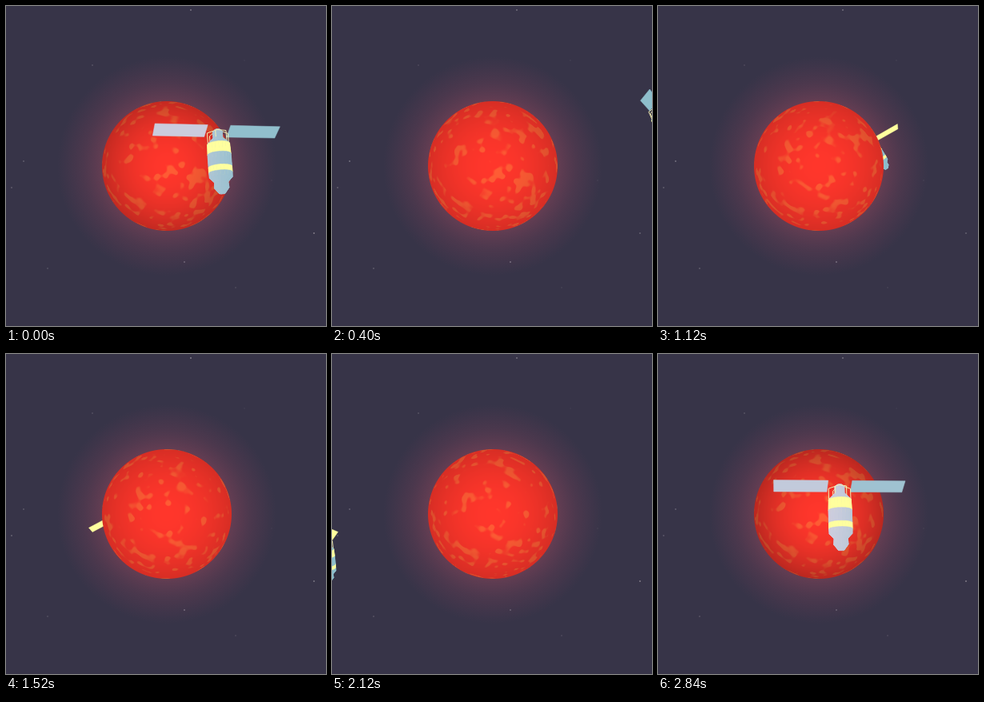
An HTML page with a canvas that plays this animation: 400 px wide and 400 px high, repeating every 2.88 s.

```html
<!DOCTYPE html>
<html lang="en">
<head>
<meta charset="utf-8">
<title>Satellite around a red star</title>
<style>
  html, body { margin: 0; width: 100%; height: 100%; overflow: hidden; background: #373448; }
  canvas { display: block; width: 100vmin; height: 100vmin; }
</style>
</head>
<body>
<canvas id="stage" width="400" height="400"></canvas>
<script>
const ctx = document.getElementById('stage').getContext('2d');
const LOOP = 2880, STEP = 40;
const SUN = { x: 201, y: 200, r: 81 };

// Orbit seen edge-on, rolled to the right; perspective camera.
const ORBIT = 316, CAMERA = 885, FOCAL = CAMERA - ORBIT;
const ROLL = Math.atan(0.25), CR = Math.cos(ROLL), SR = Math.sin(ROLL);
const START_ANGLE = 12.3, DEGREES_PER_MS = 0.1242;

const BLUE = [142, 190, 204], SHINE = [206, 205, 222];
const YELLOW = [255, 255, 158], CREAM = [246, 240, 178];

const clamp = v => Math.max(0, Math.min(1, v));
const mix = (a, b, k) => a + (b - a) * k;
const smooth = k => k * k * (3 - 2 * k);
const rgb = c => `rgb(${c.map(Math.round).join()})`;
const orbitAngle = t => (START_ANGLE + DEGREES_PER_MS * t) * Math.PI / 180;

// Satellite space -> [screen x, screen y, depth]
function project([x, y, z], angle) {
  const along = CR * x - SR * y, across = SR * x + CR * y, out = z + ORBIT;
  const c = Math.cos(angle), s = Math.sin(angle);
  const u = along * c + out * s, depth = out * c - along * s;
  const scale = FOCAL / (CAMERA - depth);
  return [200 + (u * CR + across * SR) * scale, 200 + (across * CR - u * SR) * scale, depth];
}

// Surface of revolution, leaning slightly towards the viewer at its lower end.
const ringPoint = (y, r, a) => {
  const front = r * Math.sin(a);
  return [r * Math.cos(a), y - 0.2 * front, 0.2 * (y + 30) + front];
};

const PROFILE = [ // y, radius, colour of the band below
  [-30, 3, BLUE], [-27, 6, BLUE], [-19, 6, BLUE], [-11, 14, YELLOW], [2, 14.5, BLUE],
  [18, 14.5, YELLOW], [25, 14.5, BLUE], [31, 14.2, BLUE], [37, 8.5, BLUE], [44, 9, BLUE], [51, 3.5]
];

function buildSatellite() {
  const parts = [], SIDES = 20, turn = i => i / SIDES * 2 * Math.PI;
  for (let b = 0; b < PROFILE.length - 1; b++) {
    const [y0, r0, color] = PROFILE[b], [y1, r1] = PROFILE[b + 1];
    for (let i = 0; i < SIDES; i++) {
      const a = turn(i), e = turn(i + 1);
      parts.push({ color, points: [ringPoint(y0, r0, a), ringPoint(y0, r0, e), ringPoint(y1, r1, e), ringPoint(y1, r1, a)] });
    }
  }
  for (const [x0, x1] of [[-82, -15], [15, 82]])
    parts.push({ color: BLUE, back: YELLOW,
      points: [[x0, -34.5, 8], [x1, -34.5, 8], [x1, -21.5, -8], [x0, -21.5, -8]] });
  for (let i = 0; i < 6; i++) {
    const a = i * Math.PI / 3;
    parts.push({ color: CREAM, line: true,
      points: [[0, -30, 0], ringPoint(-25, 13.8, a), ringPoint(-11, 13.8, a)] });
  }
  return parts;
}
const satellite = buildSatellite();

function drawSatellite(angle) {
  const faces = satellite.map(part => {
    const pts = part.points.map(p => project(p, angle));
    const mean = k => pts.reduce((sum, p) => sum + p[k], 0) / pts.length;
    return { ...part, pts, x: mean(0), depth: mean(2) };
  }).sort((a, b) => a.depth - b.depth);

  for (const { pts, x, color, back, line } of faces) {
    const area = pts.reduce((sum, p, i) => {
      const q = pts[(i + 1) % pts.length];
      return sum + p[0] * q[1] - q[0] * p[1];
    }, 0);
    let tint = back && area < 0 ? back : color;
    if (tint === BLUE && Math.cos(angle) > 0) {
      const shine = Math.exp(-(((x - 205) / 60) ** 2));
      tint = BLUE.map((v, i) => mix(v, SHINE[i], shine));
    }
    ctx.beginPath();
    pts.forEach(p => ctx.lineTo(p[0], p[1]));
    ctx.strokeStyle = ctx.fillStyle = rgb(tint);
    ctx.lineWidth = line ? 1 : 0.5;
    if (!line) { ctx.closePath(); ctx.fill(); }
    ctx.stroke();
  }
}

// Seeded value noise for the star's surface
function hash(x, y, z) {
  let h = Math.imul(x, 374761393) ^ Math.imul(y, 668265263) ^ Math.imul(z, 1274126177);
  h = Math.imul(h ^ (h >>> 13), 1103515245);
  return ((h ^ (h >>> 16)) >>> 0) / 4294967296;
}
function noise(x, y, z) {
  const i = Math.floor(x), j = Math.floor(y), k = Math.floor(z);
  const u = smooth(x - i), v = smooth(y - j), w = smooth(z - k);
  const row = (b, c) => mix(hash(i, b, c), hash(i + 1, b, c), u);
  const plane = c => mix(row(j, c), row(j + 1, c), v);
  return mix(plane(k), plane(k + 1), w);
}

const SIZE = 166, GRAIN = 10;
const surface = Object.assign(document.createElement('canvas'), { width: SIZE, height: SIZE });
const surfaceCtx = surface.getContext('2d');
const pixels = surfaceCtx.createImageData(SIZE, SIZE);

function drawSun(t, angle) {
  const a = t / LOOP * 2 * Math.PI, dx = 40 + 1.2 * Math.cos(a), dy = 40 + 0.6 * Math.sin(a);
  // The rim darkens further while the satellite passes in front.
  const rimShade = 0.16 + 0.12 * Math.max(0, Math.cos(angle)) ** 20;
  for (let py = 0, n = 0; py < SIZE; py++) {
    for (let px = 0; px < SIZE; px++, n += 4) {
      const x = (px + 0.5 - SIZE / 2) / SUN.r, y = (py + 0.5 - SIZE / 2) / SUN.r;
      const d = Math.hypot(x, y);
      const cover = clamp((1 - d) * SUN.r + 0.5);
      pixels.data[n + 3] = 255 * cover;
      if (!cover) continue;
      const z = Math.sqrt(Math.max(0, 1 - d * d));
      // Sample on skewed axes so that the noise lattice does not show.
      const p = 0.8 * x + 0.6 * y, q = 0.48 * x - 0.64 * y + 0.6 * z, r = 0.36 * x - 0.48 * y - 0.8 * z;
      const spot = smooth(clamp((noise(p * GRAIN + dx, q * GRAIN + dy, r * GRAIN + 40) - 0.6) / 0.2));
      const light = 1 - rimShade * d * d;
      pixels.data[n] = 255 * light;
      pixels.data[n + 1] = mix(54, 92, spot) * light;
      pixels.data[n + 2] = mix(43, 52, spot) * light;
    }
  }
  surfaceCtx.putImageData(pixels, 0, 0);
  ctx.drawImage(surface, SUN.x - SIZE / 2, SUN.y - SIZE / 2);
}

const glow = ctx.createRadialGradient(SUN.x, SUN.y, 78, SUN.x, SUN.y, 137);
glow.addColorStop(0, 'rgba(170,76,98,.42)');
glow.addColorStop(0.45, 'rgba(150,70,95,.22)');
glow.addColorStop(1, 'rgba(140,65,95,0)');

const STARS = [[231, 5, .8], [108, 74, .3], [22, 194, .6], [7, 227, .5], [385, 284, .7],
  [52, 328, .4], [223, 320, .7], [287, 352, .2], [332, 218, .1], [298, 68, .1]];

function drawSky(t) {
  ctx.fillStyle = '#373448';
  ctx.fillRect(0, 0, 400, 400);
  ctx.fillStyle = glow;
  ctx.fillRect(0, 0, 400, 400);
  STARS.forEach(([x, y, light], i) => {
    const twinkle = 0.8 + 0.2 * Math.sin(t / LOOP * 8 * Math.PI + i * 2);
    ctx.fillStyle = `rgba(205,200,205,${light * twinkle})`;
    ctx.fillRect(x - 1, y - 0.5, 2, 1);
  });
}

function render(now) {
  const t = Math.floor(now % LOOP / STEP) * STEP;
  const angle = orbitAngle(t);
  const behind = Math.cos(angle) < 0;
  drawSky(t);
  if (behind) drawSatellite(angle);
  drawSun(t, angle);
  if (!behind) drawSatellite(angle);
}

const start = performance.now();
function frame() {
  render(performance.now() - start);
  requestAnimationFrame(frame);
}
frame();
</script>
</body>
</html>
```
